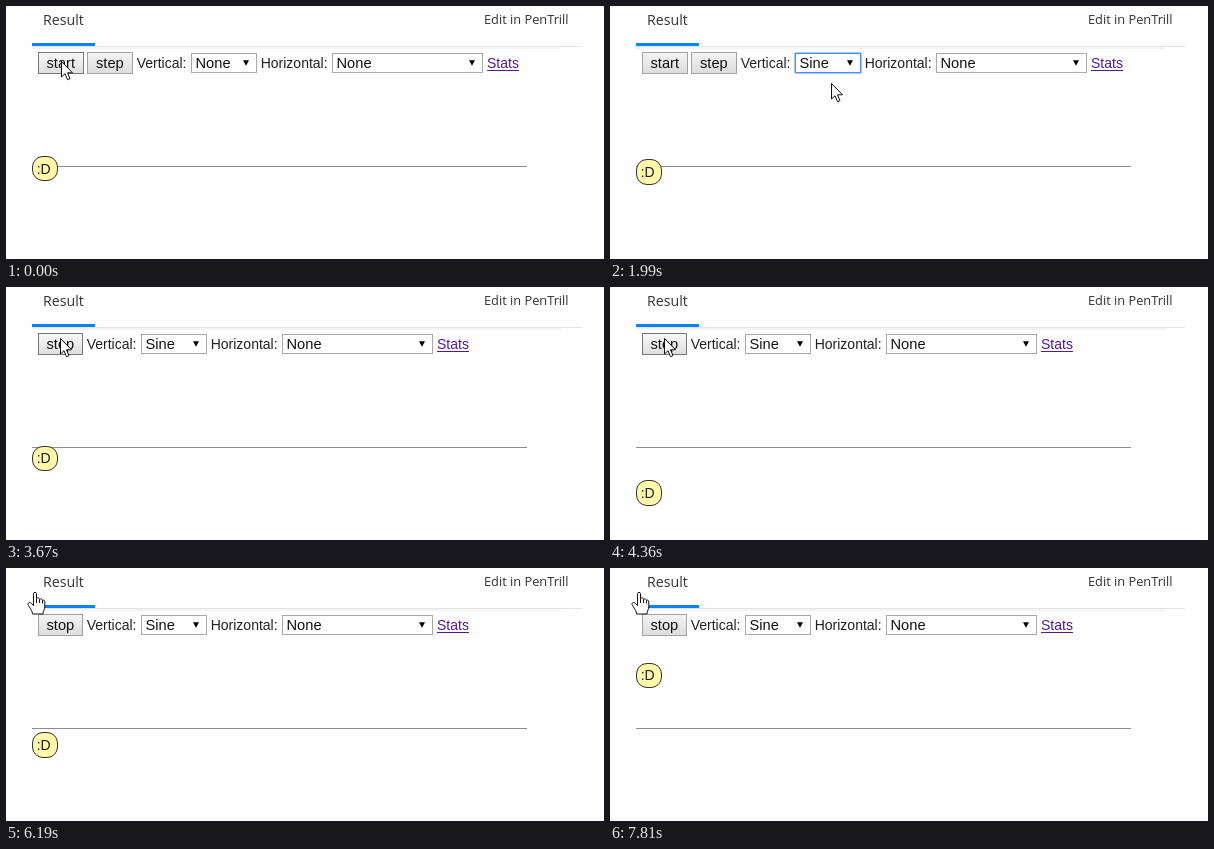
Animation, 598 px wide and 253 px high, one loop 8 s. Source, as an HTML page:

```html
<!DOCTYPE html>
<html lang="en">
<head>
<meta charset="utf-8">
<title>Sine motion demo</title>
<style>
  html, body { margin: 0; width: 100%; height: 100%; overflow: hidden; background: #fefefe; }
  svg { display: block; }
  text { fill: #222; font: 14px "Liberation Sans", Arial, sans-serif; white-space: pre; }
  .tab { font: 14.2px "Open Sans", "Noto Sans", sans-serif; fill: #333; }
  .edit { font-size: 12.8px; }
  .ui { font-size: 14.67px; fill: #111; }
  .btn rect { fill: url(#face); stroke: #a3a3a3; }
  .btn.hover rect { fill: url(#lit); stroke: #777; }
  .btn.down rect { fill: #dcdcdc; stroke: #777; }
  .box { fill: #fff; stroke: #a9a9a9; }
  .focus .box { stroke: #4a8df0; }
  .ring { fill: none; stroke: #a9c8f9; display: none; }
  .focus .ring { display: inline; }
  .link { fill: #551a8b; }
  .item rect { fill: none; }
  .item.on rect { fill: #1e90ff; }
  .item.on text { fill: #fff; }
  .pointer { fill: #fff; stroke: #111; stroke-linejoin: round; }
</style>
</head>
<body>
<svg width="598" height="253" viewBox="0 0 598 253">
  <defs>
    <linearGradient id="face" x2="0" y2="1">
      <stop stop-color="#f4f4f4"/><stop offset="1" stop-color="#dcdcdc"/>
    </linearGradient>
    <linearGradient id="lit" x2="0" y2="1">
      <stop stop-color="#f8f8f8"/><stop offset="1" stop-color="#dedede"/>
    </linearGradient>
  </defs>

  <rect x="26" y="40" width="549" height="1" fill="#e4e5e6"/>
  <rect x="26" y="41" width="529" height="2" fill="#f4f4f4"/>
  <rect x="26" y="37" width="63" height="3" fill="#0a84f5"/>
  <text class="tab" x="37" y="19">Result</text>
  <text class="tab edit" x="478" y="18">Edit in PenTrill</text>

  <rect x="26" y="160" width="495" height="1" fill="#8c8c8c"/>
  <rect id="ball" x="26.5" width="25" rx="10.5" fill="#fff8ab" stroke="#333"/>
  <text id="face-text" x="30.7">:D</text>

  <g id="start" class="btn">
    <rect x="32.5" y="46.5" width="45" height="21"/>
    <text class="ui" x="40.5" y="62">start</text>
  </g>
  <g id="step" class="btn">
    <rect x="81.5" y="46.5" width="45" height="21"/>
    <text class="ui" x="90" y="62">step</text>
  </g>
  <g id="stop" class="btn">
    <rect x="32.5" y="46.5" width="44" height="21"/>
    <text class="ui" x="40.5" y="62">stop</text>
  </g>

  <g id="fields">
    <text x="130.7" y="62">Vertical:</text>
    <g id="vertical">
      <rect class="ring" x="184.5" y="46.5" width="67" height="21" rx="1"/>
      <rect class="box" x="185.5" y="47.5" width="65" height="19"/>
      <text id="choice" class="ui" x="189.5" y="62">None</text>
      <path d="M237 54.3h6l-3 5.4z"/>
    </g>
    <text x="254.7" y="62">Horizontal:</text>
    <rect class="box" x="326.5" y="47.5" width="150" height="19"/>
    <text class="ui" x="330.5" y="62">None</text>
    <path d="M463 54.3h6l-3 5.4z"/>
    <text class="link" x="481" y="62">Stats</text>
    <rect class="link" x="481" y="64" width="32" height="1"/>
  </g>

  <g id="menu">
    <rect x="185.5" y="67.5" width="65" height="58" fill="#fff" stroke="#4a98e8"/>
    <g class="item"><rect x="186" y="68" width="64" height="19"/><text class="ui" x="189.5" y="82">Sine</text></g>
    <g class="item"><rect x="186" y="87" width="64" height="19"/><text class="ui" x="189.5" y="101">Linear</text></g>
    <g class="item"><rect x="186" y="106" width="64" height="19"/><text class="ui" x="189.5" y="120">None</text></g>
  </g>

  <g id="cursor">
    <path id="arrow" class="pointer" d="M-.5 .5V16L3 12.7 5.5 18.7 8 17.6 5.5 11.8H10.5Z"/>
    <g id="hand">
      <path class="pointer" d="M-1.5 12V1.5C-1.5 0 1.5 0 1.5 1.5V6.5C2.5 5.3 4.5 5.7 4.5 7.5 5.5 6.3 7.5 6.8 7.5 8.5 8.8 7.5 9.8 8.5 9.8 10V15C9.8 17.5 8 18.5 8 22H-2.5C-2.5 19.5-4 17.5-6.5 13.5-8 11-5.5 9.5-3.8 11.2L-1.5 13.5Z"/>
      <path d="M1.5 6.5V11M4.5 7.5V11M7.5 8.5V11.5" fill="none" stroke="#111"/>
    </g>
  </g>
</svg>
<script>
const LOOP = 8000, OPEN = 1160, PICK = 1990, PRESS = 3400, RELEASE = 3520, RUN = 3670;
const HOLD = 120; // pointer refresh interval
const $ = id => document.getElementById(id);
const items = document.querySelectorAll('.item');

// Pointer moves: begin, end, target x, target y
const moves = [
  [410, 890, 221, 63],
  [1320, 1560, 222, 77],
  [2580, 2830, 230, 79],
  [2860, 3130, 84, 50],
  [3140, 3260, 55, 51],
  [4510, 4870, 29, 24]
];

const ease = p => p < .5 ? 4 * p ** 3 : 1 - 4 * (1 - p) ** 3;
const show = (id, on) => $(id).style.display = on ? '' : 'none';
const place = (id, x, y) => $(id).setAttribute('transform', `translate(${x} ${y})`);

function pointerAt(t) {
  let x = 56, y = 55;
  for (const [begin, end, toX, toY] of moves) {
    if (t < begin) break;
    const held = Math.floor((t - begin) / HOLD) * HOLD;
    const p = t >= end ? 1 : ease(held / (end - begin));
    x += (toX - x) * p;
    y += (toY - y) * p;
  }
  return [Math.round(x), Math.round(y)];
}

function ballY(t) {
  if (t < PICK) return 150;
  if (t < RUN) return 153.4;
  const n = Math.floor((t - RUN + 40) / 133.5);
  return 150.5 + 56 * Math.sin(.145 + .1447 * n);
}

function drawBall(y) {
  const top = Math.round(y), height = Math.round(y + 25.3) - top;
  $('ball').setAttribute('y', top + .5);
  $('ball').setAttribute('height', height - 1);
  $('face-text').setAttribute('y', Math.floor(y) + 18);
}

function draw(t) {
  const [x, y] = pointerAt(t);
  const running = t >= RUN;
  const over = (left, right) => y >= 46 && y < 68 && x >= left && x < right;
  const onTab = y < 40;

  drawBall(ballY(t));
  place('cursor', x, y);
  place('fields', running ? -50 : 0, 0);
  show('arrow', !onTab);
  show('hand', onTab);
  show('start', !running);
  show('step', !running);
  show('stop', running);
  show('menu', t >= OPEN && t < PICK);

  $('start').classList.toggle('hover', over(32, 78));
  $('start').classList.toggle('down', t >= PRESS && t < RELEASE);
  $('step').classList.toggle('hover', over(81, 127));
  $('stop').classList.toggle('hover', over(32, 77));
  $('vertical').classList.toggle('focus', t >= OPEN && t < PRESS);
  $('choice').textContent = t < PICK ? 'None' : 'Sine';

  const active = y < 68 ? 2 : 0;
  items.forEach((el, i) => el.classList.toggle('on', i === active));
}

function frame() {
  draw(performance.now() % LOOP);
  requestAnimationFrame(frame);
}
frame();
</script>
</body>
</html>
```
